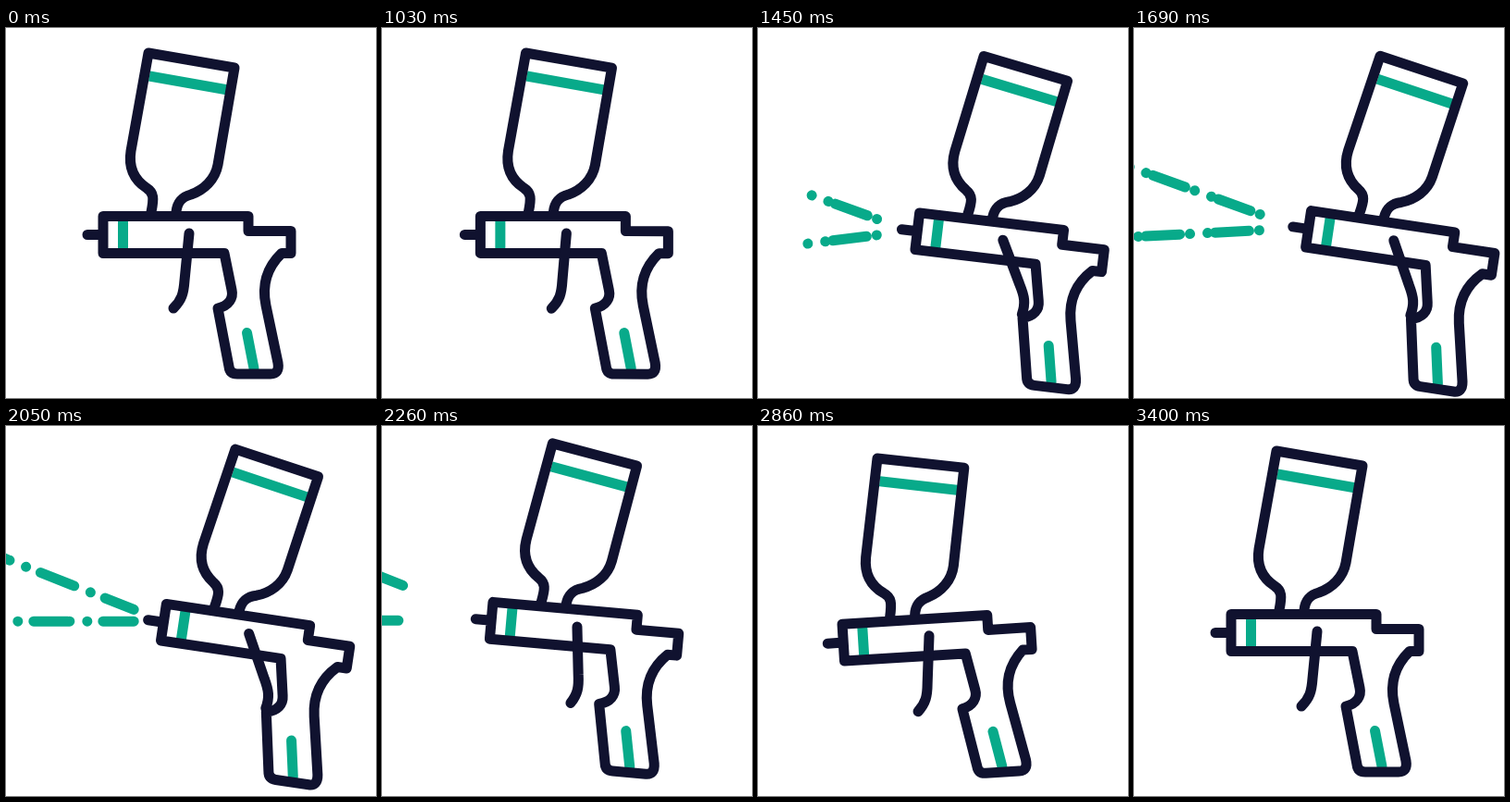
Recreate the animation shown at these times as an HTML page with a canvas. Size 400 by 400 pixels, loop 3.43 s.

```html
<!DOCTYPE html>
<html lang="en">
<head>
<meta charset="utf-8">
<title>Spray gun</title>
<style>
html, body { margin: 0; height: 100%; overflow: hidden; background: #fff; }
canvas { display: block; width: 100vmin; height: 100vmin; }
</style>
</head>
<body>
<canvas width="400" height="400"></canvas>
<script>
const ctx = document.querySelector('canvas').getContext('2d');
const LOOP = 3430, STEP = 30;
const NAVY = '#10122f', GREEN = '#08aa8a';
const SPRAY_START = 1212, SPRAY_END = 2060, SPRAY_SPEED = 0.34;

const outline = new Path2D(
  'M105 203.5H262V219.5H308V243.5H298C283 258 276 276 281 300L294 362Q296 374 286 374H250' +
  'Q242 374 241 366L229 303C241 300 246 292 244 283L236 243.5H105ZM88 223.5H105' +
  'M157 199C160 184 160 178 152 173C140 165 132 152 135 133L154 27L247 43L229 148' +
  'C226 164 214 175 200 180C189 183 185 189 184 199');
const accents = new Path2D('M155 52L240 67M126.5 205V242');
const gripLine = new Path2D('M260.5 329.5L268 368');
const trigger = new Path2D('M198 222L193 273C192 287 190 294 181 303');

const rad = deg => deg * Math.PI / 180;
const progress = (t, start, end) => Math.min(1, Math.max(0, (t - start) / (end - start)));

// Sine ease from 0 to 1; a power below 1 gives a quicker start
const ease = (t, start, end, power = 1) =>
  (1 - Math.cos(Math.PI * progress(t, start, end) ** power)) / 2;

// Recoil, swing back past the rest pose, settle
const gunPose = t => ({
  x: 86 * ease(t, 1000, 1690, 0.8) - 109.5 * ease(t, 1880, 2517) + 23.5 * ease(t, 2575, 3240),
  y: 8.2 * ease(t, 1000, 1540) - 13.2 * ease(t, 1860, 2300)
    + 9.9 * ease(t, 2260, 2560) - 4.9 * ease(t, 2800, 3360),
  tilt: 8.5 * ease(t, 1000, 1640) - 12.2 * ease(t, 2050, 2640) + 3.7 * ease(t, 2780, 3400),
  pull: -33 * ease(t, 1000, 1330) + 38.7 * ease(t, 2060, 2440) - 5.7 * ease(t, 2500, 2860)
});

function rotateAbout(x, y, deg) {
  ctx.translate(x, y);
  ctx.rotate(rad(deg));
  ctx.translate(-x, -y);
}

function stroke(path, color, cap = 'round') {
  ctx.strokeStyle = color;
  ctx.lineCap = cap;
  ctx.stroke(path);
}

function drawJet(x, y, angle, head, tail) {
  const c = Math.cos(rad(angle)), s = Math.sin(rad(angle));
  const jet = new Path2D();
  jet.moveTo(x - head * c, y - head * s);
  jet.lineTo(x - tail * c, y - tail * s);
  stroke(jet, GREEN);
}

function drawSpray(t, { x, y, tilt }) {
  const head = (t - SPRAY_START) * SPRAY_SPEED;
  const tail = Math.max(0, (t - SPRAY_END) * SPRAY_SPEED);
  if (head < 0 || tail > 250) return;
  const c = Math.cos(rad(tilt)), s = Math.sin(rad(tilt));
  const gap = 16 + 8 * Math.sin(Math.PI * progress(t, 1270, 2050));
  const startX = 200 + x - 112 * c - 23 * s - gap;
  const tipY = 200 + y - 112 * s + 23 * c;
  const settle = ease(t, 1270, 2050, 0.8);
  const late = progress(t, 1690, 2050);
  const drift = 9 * late;
  ctx.save();
  // Two dots and a dash; the dots slide ahead of the dash
  ctx.setLineDash([0.01, 19, 0.01, 8 + drift, 37, 11 - drift]);
  drawJet(startX, tipY - 8.7 - 2.3 * late, 20 + 1.6 * late, head + drift, tail - 0.5);
  drawJet(startX, tipY + 7 - 5 * settle, 9 * settle - 9, head + drift, tail - 0.5);
  ctx.restore();
}

function draw(t) {
  const pose = gunPose(t);
  ctx.fillStyle = '#fff';
  ctx.fillRect(0, 0, 400, 400);
  ctx.lineWidth = 11;
  ctx.lineJoin = 'round';
  drawSpray(t, pose);
  ctx.save();
  ctx.translate(pose.x, pose.y);
  rotateAbout(200, 200, pose.tilt);
  stroke(accents, GREEN, 'butt');
  stroke(gripLine, GREEN);
  stroke(outline, NAVY);
  rotateAbout(198, 222, pose.pull);
  stroke(trigger, NAVY);
  ctx.restore();
}

function tick() {
  const t = performance.now() % LOOP;
  draw(Math.floor((t - 10) / STEP) * STEP + 10);
  requestAnimationFrame(tick);
}
tick();
</script>
</body>
</html>
```
